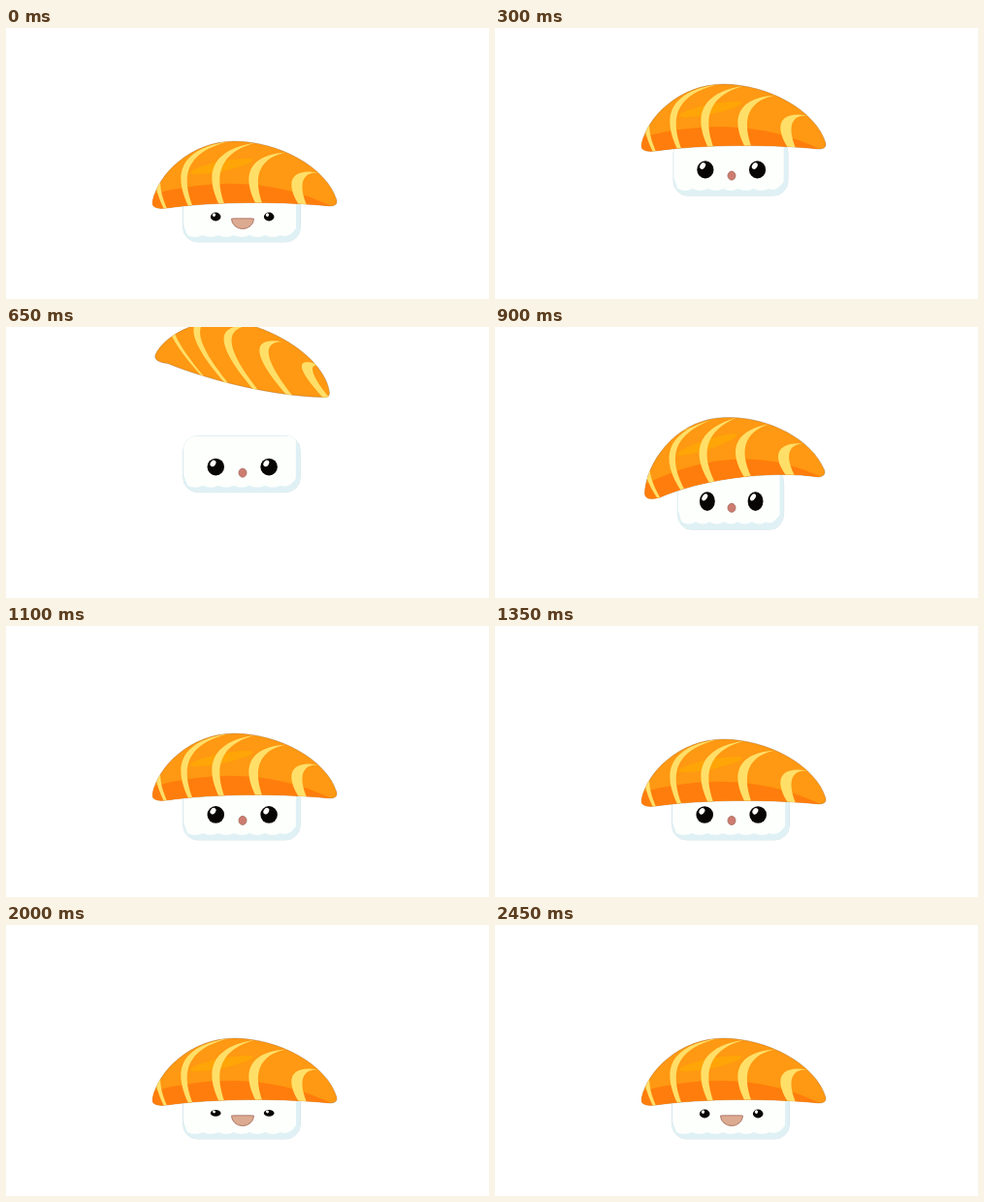
Write an HTML page with a canvas that moves like this. It is 498 px wide and 280 px high and loops after 2.55 s.

```html
<!DOCTYPE html>
<html lang="en">
<head>
<meta charset="utf-8">
<title>Jumping sushi</title>
<style>
  html, body { margin: 0; width: 100%; height: 100%; overflow: hidden; background: #fff; }
  canvas { display: block; width: 498px; height: 280px; }
</style>
</head>
<body>
<canvas id="stage" width="498" height="280"></canvas>
<script>
const ctx = document.getElementById('stage').getContext('2d');
const LOOP = 2550, STEP = 50, LAST = 2450, FLOOR = 221;

const lerp = (a, b, k) => a + (b - a) * k;
const span = (t, a, b) => Math.min(1, Math.max(0, (t - a) / (b - a)));
// 0 to 1 to 0 between a and b: ballistic, and with soft ends.
const hop = (t, a, b) => 4 * span(t, a, b) * (1 - span(t, a, b));
const swell = (t, a, b) => Math.sin(Math.PI * span(t, a, b)) ** 2;

function pose(t) {
  const jump = 57 * hop(t, 0, 970);
  const sy = 1 + .12 * (swell(t, 225, 675) + swell(t, 675, 1125));
  const tilt = 13.8 * hop(t, 330, 850) - 7.5 * hop(t, 850, 1000);
  return {
    sy, sx: 1 - .8 * (sy - 1),
    bottom: Math.min(FLOOR, FLOOR - jump + 29 * (sy - 1)),
    lift: jump + 83 * hop(t, 280, 907) + 8 * hop(t, 1050, 1250),
    tilt, bend: tilt * .85,
    shear: .95 * swell(t, 450, 850),
    smile: 1 - span(t, 100, 200) + span(t, 1500, 1650),
    squint: swell(t, 1800, 2200),
    flat: t >= 400 && t < 550,
    shaded: t < 400 || t >= 850
  };
}

function fill(path, color) {
  ctx.fillStyle = color;
  ctx.fill(path);
}

function outline(path, color, width) {
  ctx.strokeStyle = color;
  ctx.lineWidth = width;
  ctx.stroke(path);
}

function oval(x, y, rx, ry, turn = 0) {
  const path = new Path2D();
  path.ellipse(x, y, rx, ry, turn, 0, Math.PI * 2);
  return path;
}

// Fish coordinates start midway between the two tips.
function fishBody(bend) {
  const top = bend - 64, belly = bend * 4 / 3 - 2, side = bend * .5;
  return new Path2D(`M-95-1C-90 ${side - 30} -55 ${top} -11 ${top}
    C35 ${top} 85 ${side - 37} 95-3Q96 3 88 3
    C40 ${belly} -30 ${belly} -80 5Q-96 7 -95-1Z`);
}

// Crescents that grow wider and further apart to the right.
function stripe(i) {
  const x = -84 + 24 * i + 3 * i * i, w = 5 + 1.6 * i;
  const tx = x + 46 - 6 * i, ty = ((tx + 11) / 16) ** 2 - 64;
  const y1 = ty * .25 - 15, y2 = ty * .5 - 24, d = w * .6;
  return new Path2D(`M${x + 3 - w * .3} 7
    C${x - 15 - d} ${y1} ${x - 5 - d} ${y2} ${tx} ${ty}
    C${x - 5 + d} ${y2 + 3} ${x - 15 + d} ${y1} ${x + 3 + w * .3} 7Z`);
}

function drawFish({ lift, tilt, bend, shear, flat, shaded }) {
  const body = fishBody(bend);
  ctx.save();
  ctx.translate(246 - tilt * .2, 181 - lift);
  ctx.rotate(tilt * Math.PI / 180);
  ctx.scale(1 - .0025 * Math.abs(tilt), 1);
  fill(body, flat ? '#f79f3c' : '#ff9812');
  outline(body, 'rgba(110, 70, 30, .45)', .6);
  ctx.clip(body);
  if (shaded) {
    fill(new Path2D(`M-100-8Q10 ${bend * 2 - 38} 95 6V40H-100Z`), '#ff7d0c');
    fill(oval(-24, bend - 38, 33, 5, -.2), '#ffa507');
  }
  if (flat) {
    const band = new Path2D();
    band.rect(-70, bend - 50, 170, 24);
    ctx.clip(band);
  }
  ctx.transform(1, 0, shear, 1, shear * 33, 0);
  for (let i = 0; i < 5; i++) {
    const drop = bend * (1 - (i / 2 - 1) ** 2 * .7);
    ctx.translate(0, drop);
    fill(stripe(i), flat ? '#fff' : '#ffdf68');
    ctx.translate(0, -drop);
  }
  ctx.restore();
}

function drawRice({ bottom, sx, sy }) {
  const box = new Path2D(), top = new Path2D();
  box.roundRect(-60.5, -58, 121, 58, 15);
  top.moveTo(-60, -18);
  top.lineTo(-60, -58);
  top.lineTo(56, -58);
  top.lineTo(56, -14);
  for (let x = 56; x > -56; x -= 16) top.quadraticCurveTo(x - 8, -3, x - 16, -7);
  top.closePath();
  ctx.save();
  ctx.translate(243, bottom);
  ctx.scale(sx, sy);
  outline(box, '#cfdfe5', .8);
  ctx.clip(box);
  fill(box, '#dff1f4');
  fill(top, '#fdfffd');
  ctx.restore();
}

function drawEye(x, y, rx, ry) {
  fill(oval(x, y, rx, ry), '#080605');
  fill(oval(x - rx * .32, y - ry * .42, rx * .3, ry * .4, .6), '#fff');
}

function drawMouth(x, y, smile, flat) {
  const w = lerp(4, 11.5, smile), path = new Path2D();
  path.ellipse(x, y, w, lerp(4.5, .2, smile), 0, Math.PI, Math.PI * 2);
  path.ellipse(x, y, w, lerp(4.5, 10.5, smile), 0, 0, Math.PI);
  path.closePath();
  fill(path, flat ? '#fff' : smile > .5 ? '#dcaa90' : '#cf7c70');
  outline(path, flat ? '#777' : '#a06a58', .8);
}

function drawFace({ bottom, sx, sy, smile, squint, flat }) {
  const cy = bottom - 29 * sy;
  const rx = lerp(8.8, 5.3, smile) * sx, ry = (lerp(8.8, 4.4, smile) - squint) * sy;
  for (const side of [-1, 1]) drawEye(243.7 + side * 27.5 * sx, cy + 3 * sy - squint * .6, rx, ry);
  drawMouth(244, cy + lerp(9, 5, smile) * sy, smile, flat);
}

function draw(t) {
  const now = pose(t);
  ctx.fillStyle = '#fff';
  ctx.fillRect(0, 0, 498, 280);
  drawRice(now);
  drawFace(now);
  drawFish(now);
}

const start = performance.now();
function tick() {
  const t = (performance.now() - start) % LOOP;
  draw(Math.min(LAST, Math.floor(t / STEP) * STEP));
  requestAnimationFrame(tick);
}
tick();
</script>
</body>
</html>
```
